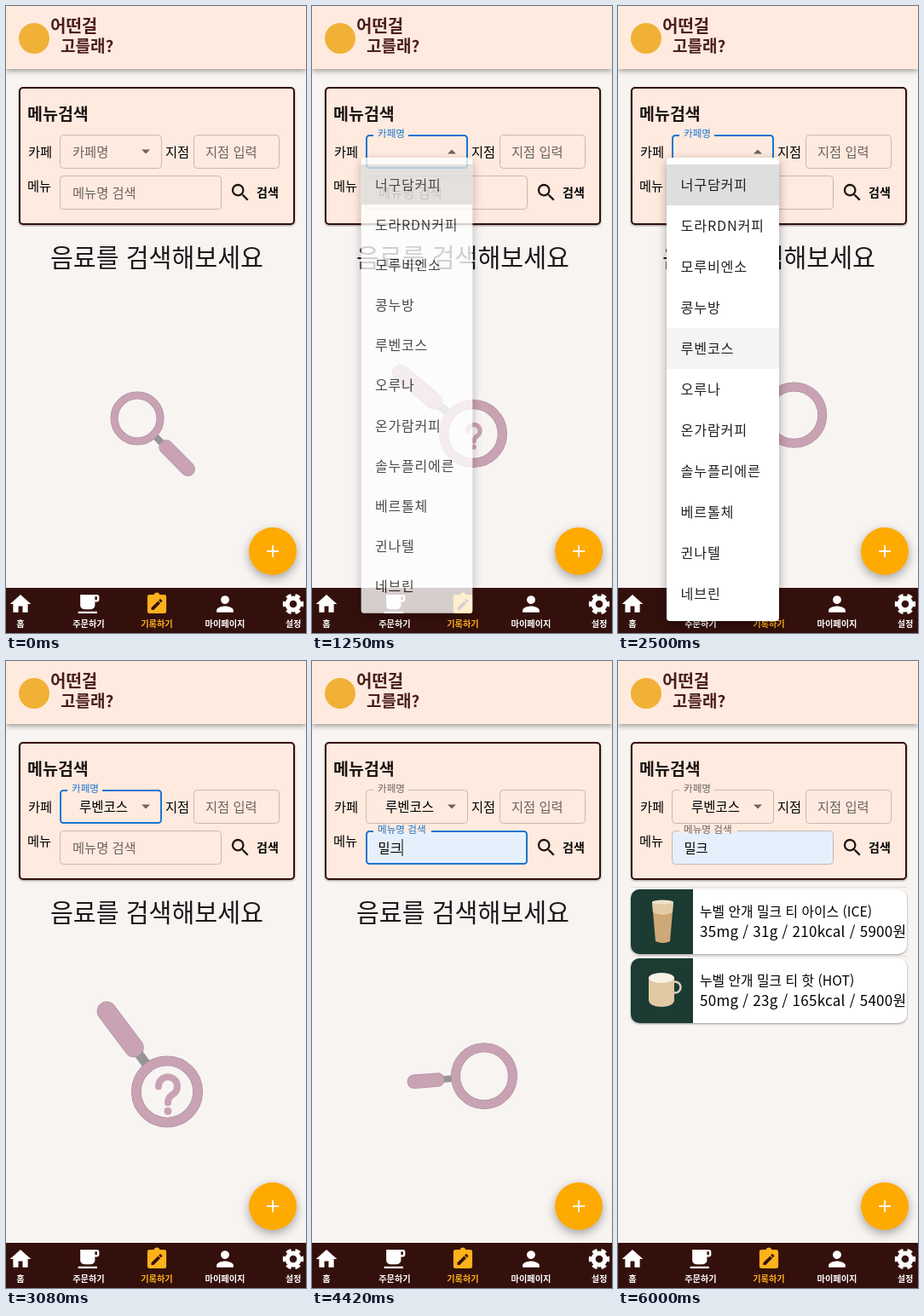
An HTML page that plays this animation: 352 by 736 pixels, repeating every 6.51 s.

```html
<!DOCTYPE html>
<html lang="ko">
<head>
<meta charset="utf-8">
<style>
  html, body { margin: 0; width: 100%; height: 100%; overflow: hidden; background: #f8f4f2; }
  svg { display: block; width: 352px; height: 736px; }
  text { font-family: "Noto Sans CJK KR", "Noto Sans KR", "Noto Sans", sans-serif; white-space: pre; }
  .low { filter: drop-shadow(0 1px 1px #0006); }
  .mid { filter: drop-shadow(0 2px 3px #0006); }
  .high { filter: drop-shadow(0 4px 6px #0005); }
</style>
</head>
<body>
<svg id="stage" viewBox="0 0 352 736"></svg>
<script>
const LOOP = 6510, STEP = 250 / 3, LAST_STEP = 72;
const PEACH = '#ffeadf', BROWN = '#34100c', ORANGE = '#ffaa00', BLUE = '#1976d2', GREY = '#6b6360', PINK = '#c9a2b4';
const OPEN = 1080, CLOSE = 2750, TYPE = 3330, SUGGEST = 3500, PREVIEW = 3660, PICK = 3950, SEARCH = 4740, RESULT = 4830;

const cafes = ['너구담커피', '도라RDN커피', '모루비엔소', '콩누방', '루벤코스', '오루나', '온가람커피',
  '솔누플리에른', '베르톨체', '귄나텔', '네브린'];

// Text placed by its left edge and vertical centre
const text = (x, cy, size, str, attrs = '') =>
  `<text x="${x}" y="${cy + size * .38}" font-size="${size}" ${attrs}>${str}</text>`;
const rect = (x, y, w, h, fill, attrs = '') =>
  `<rect x="${x}" y="${y}" width="${w}" height="${h}" fill="${fill}" ${attrs}/>`;
const icon = (cx, cy, size, body, fill) =>
  `<g transform="translate(${cx - size / 2} ${cy - size / 2}) scale(${size / 24})" fill="${fill}">${body}</g>`;
const path = (d, attrs = '') => `<path d="${d}" ${attrs}/>`;
const field = (id, x, y, w) =>
  rect(x + .5, y + .5, w - 1, 39, 'none', `id="${id}" rx="4" stroke="#c8b8af"`) +
  rect(x + 1, y + 1, w - 2, 38, 'none', `id="${id}Focus" rx="3.5" stroke="${BLUE}" stroke-width="2" visibility="hidden"`);
const label = (id, y, str, notch) =>
  rect(72, y, notch, 3, PEACH, `id="${id}Notch"`) +
  `<g id="${id}Label">${text(0, 0, 15.3, str)}</g>`;
const nav = (x, str, body, fill = '#fff') =>
  icon(x, 702, 29.6, body, fill) +
  text(x, 725, 10.2, str, `font-weight="700" text-anchor="middle" fill="${fill}"`);

const icons = {
  home: path('M10 20v-6h4v6h5v-8h3L12 3 2 12h3v8z'),
  cup: path('M20 3H4v10c0 2.2 1.8 4 4 4h6c2.2 0 4-1.8 4-4v-3h2c1.1 0 2-.9 2-2V5c0-1.1-.9-2-2-2zm0 5h-2V5h2zM2 21h18v-2H2z'),
  note: path('M19 3h-4.2a3 3 0 0 0-5.6 0H5a2 2 0 0 0-2 2v14a2 2 0 0 0 2 2h14a2 2 0 0 0 2-2V5a2 2 0 0 0-2-2z') +
    path('M3 17.2V21h3.8L17.8 9.9l-3.7-3.7zM20.7 7a1 1 0 0 0 0-1.4l-2.3-2.3a1 1 0 0 0-1.4 0l-1.9 1.8 3.8 3.8z',
      `transform="translate(5 5.5) scale(.58)" fill="${BROWN}"`),
  person: path('M12 12a4 4 0 1 0 0-8 4 4 0 0 0 0 8zm0 2c-2.7 0-8 1.3-8 4v2h16v-2c0-2.7-5.3-4-8-4z'),
  gear: `<g fill="none" stroke="#fff"><circle cx="12" cy="12" r="5.6" stroke-width="4.2"/>
    <circle cx="12" cy="12" r="8.2" stroke-width="3.4" pathLength="12" stroke-dasharray="1.1 .9" stroke-dashoffset=".55"/></g>`,
  search: path('M15.5 14h-.8l-.3-.3a6.5 6.5 0 1 0-.7.7l.3.3v.8l5 5 1.5-1.5zm-6 0a4.5 4.5 0 1 1 0-9 4.5 4.5 0 0 1 0 9z')
};

const card = (y, name, facts, drink) =>
  `<g class="low">${rect(15, y, 324, 76, '#fff', 'rx="10"')}</g>` +
  path(`M88 ${y}H25a10 10 0 0 0-10 10v56a10 10 0 0 0 10 10h63z`, 'fill="#1b3b33"') +
  `<g transform="translate(0 ${y})">${drink}</g>` +
  text(96, y + 26, 15.8, name) +
  text(96, y + 50, 17, facts, 'letter-spacing=".27"');

const iced = path('M40 15h25l-4 46q-8 4-17 0z', 'fill="#cfa878"') +
  path('M40 15h25l-1 12q-12 6-23 0z', 'fill="#e3cba6"') +
  '<ellipse cx="52.500" cy="15" rx="12.500" ry="2.500" fill="#efe2cd"/>';
const hot = '<circle cx="67" cy="34" r="6.500" fill="none" stroke="#ddd0bb" stroke-width="2.500"/>' +
  path('M36 22h30v28q-2 7-15 7t-15-7z', 'fill="#e0c9a3"') +
  '<ellipse cx="51" cy="23" rx="15" ry="6" fill="#f8f1e6"/>';

const $ = id => document.getElementById(id);
const set = (id, attrs) => { for (const k in attrs) $(id).setAttribute(k, attrs[k]); };
const show = (id, on) => set(id, { visibility: on ? 'visible' : 'hidden' });

$('stage').innerHTML =
  rect(0, 0, 352, 736, '#f8f4f2') +
  `<g class="mid">${rect(0, 0, 352, 74, PEACH)}</g>` +
  `<circle cx="33" cy="38" r="18" fill="#f1b136"/>` +
  text(52, 23, 20, '어떤걸', 'font-weight="700" fill="#4a1f1a"') +
  text(64, 47, 19, '고를래?', 'font-weight="700" fill="#4a1f1a"') +

  `<g class="low">${rect(16, 96, 322, 160, PEACH, `rx="4" stroke="${BROWN}" stroke-width="2"`)}</g>` +
  text(25, 127, 19.5, '메뉴검색', 'font-weight="700" fill="#1c1514"') +
  text(26, 171, 15.3, '카페') + text(187, 171, 15.3, '지점') + text(25, 211, 15.3, '메뉴') +
  field('cafe', 63, 151, 120) + field('branch', 220, 151, 101) + field('menu', 63, 199, 190) +
  label('cafe', 150.5, '카페명', 41) + label('menu', 198.5, '메뉴명 검색', 68) +
  text(234, 171, 15.3, '지점 입력', `fill="${GREY}"`) +
  text(86, 171, 15.5, cafes[4], 'id="chosen" font-weight="500"') +
  '<text id="query" x="77.500">밀크</text>' +
  rect(105.5, 209, 1, 20, '#000', 'id="caret"') +
  path('M-5-2.500h10l-5 5z', `id="arrow" fill="${GREY}"`) +
  icon(275, 219, 27, icons.search, '#1c1514') +
  text(294, 219, 14, '검색', 'font-weight="700"') +

  `<g id="empty">${text(52, 295, 29.2, '음료를 검색해보세요', 'font-weight="500" fill="#1c1719"')}
    <g id="lens" fill="none">
      <g id="handle" stroke-linecap="round">
        <line id="neck" stroke="#959595" stroke-linecap="butt"/>
        <line id="gripEdge" stroke="#a18a95"/><line id="grip" stroke="${PINK}"/>
      </g>
      <circle id="rimEdge" stroke="#a18a95"/><circle id="rim" stroke="${PINK}"/>
      <g id="mark">${path('M-11-8A11 11 0 1 1 6 1Q0 5 0 11', `stroke="${PINK}" stroke-width="8" stroke-linecap="round"`)}
        <circle cy="21" r="4.500" fill="${PINK}"/></g>
    </g></g>` +

  '<g id="results">' +
  rect(15, 265, 324, 1, '#e4dedb') + rect(15, 346, 324, 1, '#e4dedb') +
  card(268, '누벨 안개 밀크 티 아이스 (ICE)', '35mg / 31g / 210kcal / 5900원', iced) +
  card(349, '누벨 안개 밀크 티 핫 (HOT)', '50mg / 23g / 165kcal / 5400원', hot) + '</g>' +

  `<g class="high"><circle cx="313" cy="640" r="28" fill="${ORANGE}"/></g>` +
  path('M306 640h14M313 633v14', 'stroke="#fff" stroke-width="2"') +
  rect(0, 683, 352, 53, BROWN) +
  nav(17, '홈', icons.home) + nav(97, '주문하기', icons.cup) + nav(177, '기록하기', icons.note, '#ffb11b') +
  nav(257, '마이페이지', icons.person) + nav(337, '설정', icons.gear) +

  `<g id="suggest"><g class="low">${rect(137, 248, 60, 80, '#fff', 'rx="4"')}${path('M148 249l9-9 9 9z', 'fill="#fff"')}</g>
    ${rect(137, 288, 60, 36, '#e8e8e8', 'id="hint"')}${text(149, 271, 12.5, 'ICE')}${text(149, 306, 13.2, '밀크')}</g>` +

  `<g id="list"><g class="high">${rect(57, 178, 132, 544, '#fff', 'rx="4"')}</g>
    ${rect(57, 186, 132, 48, '#dedede')}${rect(57, 378, 132, 48, '#f4f4f4', 'id="hover"')}
    ${cafes.map((c, i) => text(73.5, 210 + 48 * i, 16.2, c, 'letter-spacing=".8" font-weight="300" fill="#222"')).join('')}</g>`;

// Lens poses: time, x, y, outer radius, handle angle, handle reach, grip half width, question mark size
const PERIOD = 1750;
const poses = [
  [0, 154, 484, 31, 45, 84, 8, 0],
  [167, 143, 491, 31, 34, 90, 9, 0],
  [333, 183, 465, 35, 94.7, 61, 5.5, 0],
  [700, 208, 478, 38, 150, 76, 7, 0],
  [1167, 195, 498, 39, 205, 90, 8.5, 0],
  [1250, 189, 502, 39.5, 220, 111, 9.5, .65],
  [1333, 189, 505.5, 41.5, 233, 118, 11, 1],
  [PERIOD, 154, 484, 31, 405, 84, 8, 0]
];

function drawLens(t) {
  t %= PERIOD;
  const i = poses.findIndex(p => p[0] > t), a = poses[i - 1], b = poses[i];
  const k = (t - a[0]) / (b[0] - a[0]);
  const [, x, y, r, angle, reach, w, mark] = a.map((v, j) => v + (b[j] - v) * k);
  const start = r + 2.1 * w;
  set('lens', { transform: `translate(${x} ${y})` });
  set('handle', { transform: `rotate(${angle})` });
  set('neck', { x1: r - 1, x2: start, 'stroke-width': w });
  set('gripEdge', { x1: start, x2: reach, 'stroke-width': 2 * w + 1 });
  set('grip', { x1: start, x2: reach, 'stroke-width': 2 * w });
  set('rimEdge', { r: r * .87, 'stroke-width': r * .26 + 1 });
  set('rim', { r: r * .87, 'stroke-width': r * .26 });
  set('mark', { transform: `translate(1 2) scale(${mark})` });
}

const ease = p => 1 - (1 - Math.min(1, Math.max(0, p))) ** 2.2;

function drawField(id, y, t, from, focused) {
  const p = ease((t - from) / 150);
  show(id + 'Focus', focused);
  set(id + 'Label', {
    transform: `translate(${78 - p} ${y + 20 - 21 * p}) scale(${1 - .24 * p})`,
    fill: focused ? BLUE : GREY
  });
  show(id + 'Notch', p > 0);
}

function drawList(t) {
  const closing = t >= CLOSE;
  const grow = closing ? 1 - ease((t - CLOSE - 90) / 200) : ease((t - OPEN) / 220);
  const opacity = closing ? 1 - ease((t - CLOSE) / 270) : ease((t - OPEN) / 330);
  const sx = .75 + .25 * grow, sy = .5625 + .4375 * grow;
  set('list', { opacity, transform: `translate(123 178) scale(${sx} ${sy}) translate(-123 -178)` });
  show('list', opacity > 0);
  show('hover', opacity > 0 && t > 2300);
}

function draw(t) {
  const picked = t >= PICK, typing = t >= TYPE && t < SEARCH;
  drawField('cafe', 151, t, OPEN, t >= OPEN && t < TYPE);
  drawField('menu', 199, t, TYPE, typing);
  set('menu', { fill: t >= PREVIEW ? '#e6f0fd' : 'none' });
  set('arrow', { transform: `translate(164 171) scale(1 ${t >= OPEN && t < CLOSE ? -1 : 1})` });
  show('chosen', t >= CLOSE);
  show('query', t >= PREVIEW);
  set('query', { 'font-size': picked ? 15.3 : 13.3, y: 224.5, 'font-weight': picked ? 500 : 400 });
  show('caret', picked && typing && (t - PICK) % 1000 < 500);
  show('suggest', t >= SUGGEST && t < PICK);
  show('hint', t >= PREVIEW && t < PICK);
  show('empty', t < RESULT);
  show('results', t >= RESULT);
  drawLens(t);
  drawList(t);
}

function tick() {
  const step = Math.floor((performance.now() % LOOP + 3.4) / STEP);
  draw(Math.min(step, LAST_STEP) * STEP);
  requestAnimationFrame(tick);
}
tick();
</script>
</body>
</html>
```
